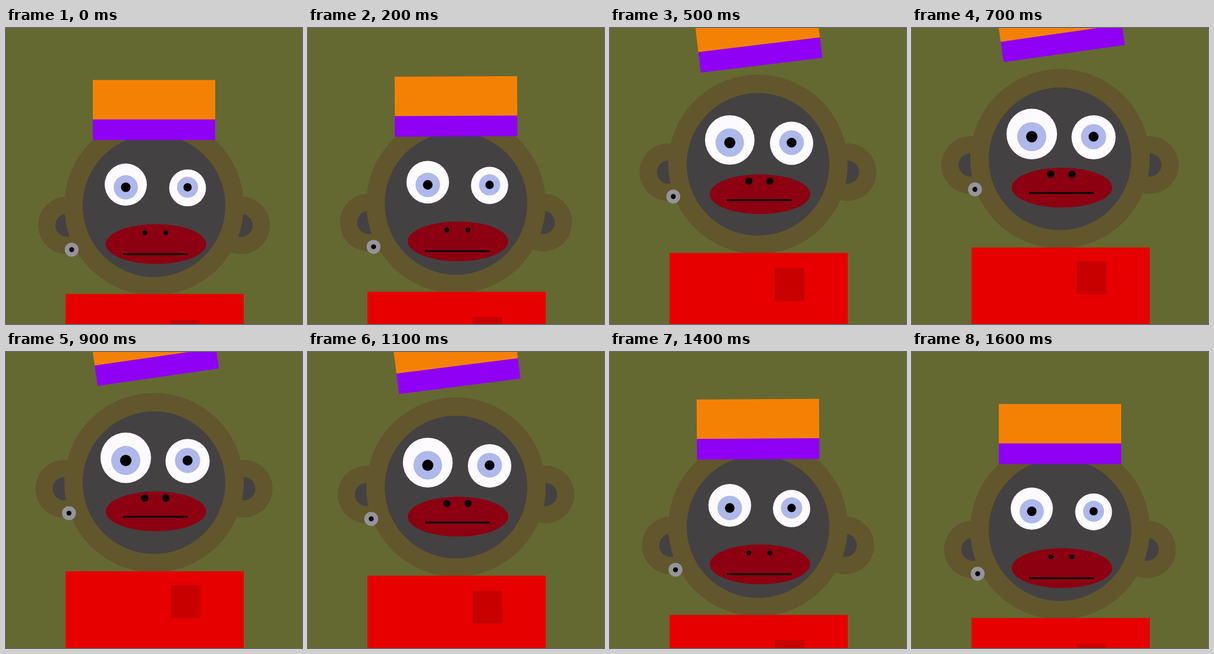
Animation of 498 by 498 pixels, one loop 1700 ms. Source, as an HTML page with a canvas:

```html
<!DOCTYPE html>
<html lang="en">
<head>
<meta charset="utf-8">
<title>Jumping monkey</title>
<style>
  html, body { margin: 0; width: 100%; height: 100%; overflow: hidden; background: #646932; }
  canvas { display: block; width: 498px; height: 498px; }
</style>
</head>
<body>
<canvas id="stage" width="498" height="498"></canvas>
<script>
const ctx = document.getElementById('stage').getContext('2d');
const LOOP = 1700, STEP = 100, APEX = 812, RISE = 803;
const MID = 249;

// Cubic-bezier easing with control points (x1, 0) and (x2, 1).
function ease(x, x1, x2) {
  let lo = 0, hi = 1;
  for (let i = 0; i < 30; i++) {
    const t = (lo + hi) / 2, u = 1 - t;
    if (3 * u * u * t * x1 + 3 * u * t * t * x2 + t * t * t < x) lo = t;
    else hi = t;
  }
  return lo * lo * (3 - 2 * lo);
}

function ellipse(x, y, rx, ry, color) {
  ctx.fillStyle = color;
  ctx.beginPath();
  ctx.ellipse(x, y, rx, ry, 0, 0, Math.PI * 2);
  ctx.fill();
}

const circle = (x, y, r, color) => ellipse(x, y, r, r, color);

function rect(x, y, w, h, color) {
  ctx.fillStyle = color;
  ctx.fillRect(x, y, w, h);
}

function eye(x, y, r, irisY, irisR, pupilR, jump) {
  const scale = 1 + 0.2 * jump, lift = 86 * jump;
  circle(x, y - lift, r * scale, '#fdfbff');
  circle(x, irisY - lift, irisR * scale, '#aeb8ea');
  circle(x, irisY - lift, pupilR * scale, '#000');
}

function ears(jump) {
  const y = 332 - 102.5 * jump, spread = 146.5 + 4.6 * jump;
  for (const side of [-1, 1]) {
    const x = MID + side * spread;
    circle(x, y, 48.5, '#62562d');
    circle(x, y, 19.5, '#444143');
  }
}

function earring(jump) {
  const x = 110.5 - 4.6 * jump, y = 373 - 102.5 * jump;
  circle(x, y, 11.7, '#96949a');
  circle(x, y, 4.2, '#000');
}

function mouth(jump) {
  ellipse(252.3, 363.5 - 96 * jump, 84.5, 33.5, '#8c0011');
  for (const x of [233.5, 269])
    circle(x, 344.5 - 99.5 * jump, 4 + 2.3 * jump, '#0a0505');
  rect(197, 379 - 104 * jump, 109, 3, '#0a0505');
}

function hat(jump, toss) {
  ctx.save();
  ctx.translate(MID, 138 - 80 * jump - 66.5 * toss);
  ctx.rotate(-8.2 * toss * Math.PI / 180);
  rect(-103, -50.5, 206, 67, '#f58104');
  rect(-103, 15.8, 206, 34.7, '#8f00f5');
  ctx.restore();
}

function draw(time) {
  const p = Math.max(0, 1 - Math.abs(time - APEX) / RISE);
  const jump = ease(p, 0.77, 0.13);
  const toss = ease(p, 0.9, 0.16);
  const headY = 299 - 79.7 * jump;

  rect(0, 0, 498, 498, '#646932');
  ears(jump);
  circle(MID, headY, 151, '#62562d');
  circle(MID, headY, 120, '#444143');
  eye(201.5, 263.5, 35.5, 268, 20.4, 8, jump);
  eye(305.5, 269, 31, 268, 17.7, 7, jump);
  mouth(jump);
  earring(jump);
  rect(100, 447.5 - 79 * jump, 300, 140, '#e70000');
  rect(277, 491 - 99.5 * jump, 50, 55.5, '#c80000');
  hat(jump, toss);
}

const start = performance.now();
function tick() {
  const time = (performance.now() - start) % LOOP;
  draw(Math.floor(time / STEP) * STEP);
  requestAnimationFrame(tick);
}
tick();
</script>
</body>
</html>
```
